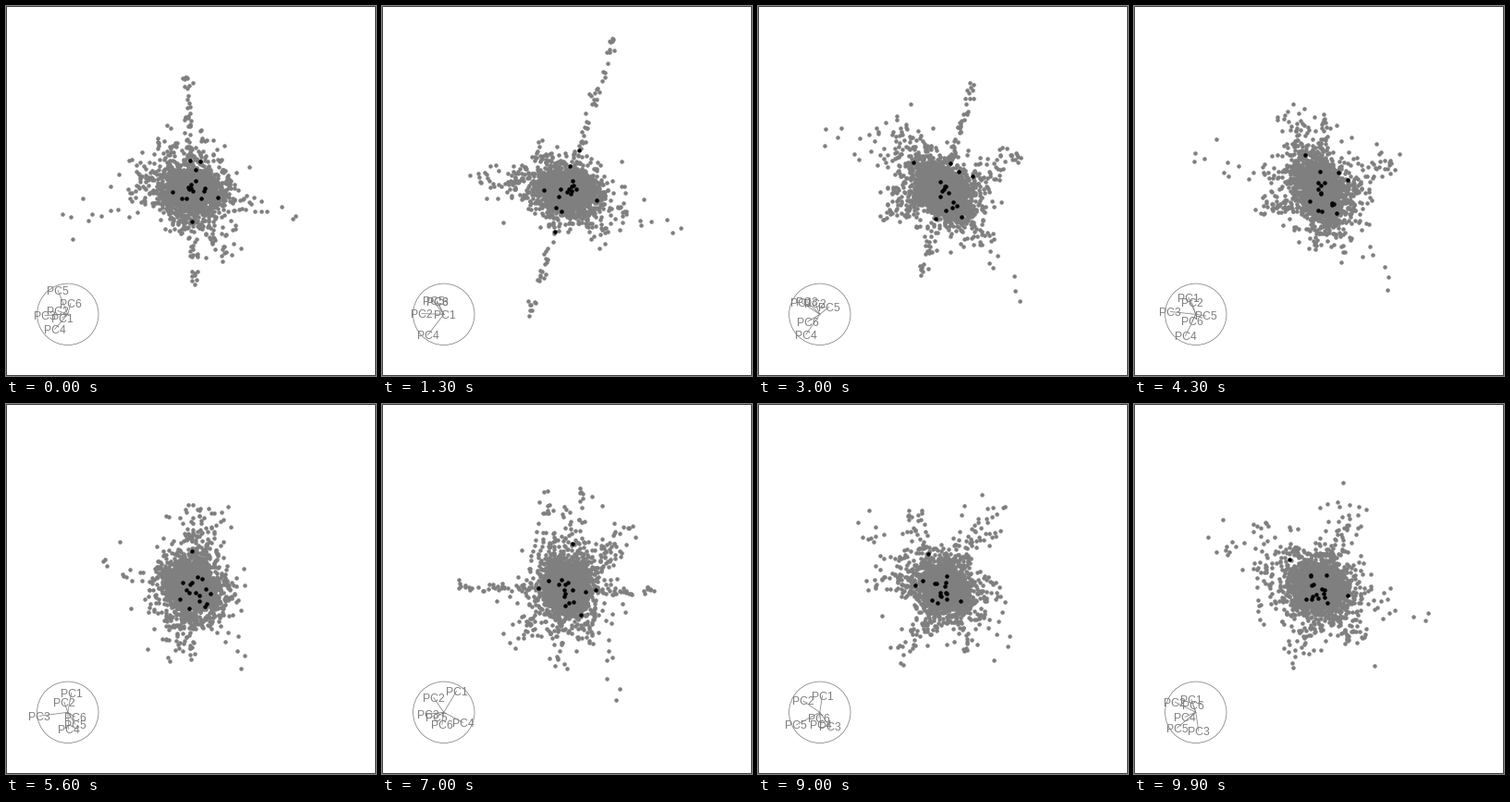
Write a matplotlib script that moves like this. It is 400 px wide and 400 px high and loops after 10 s.

```python
import numpy as np
import matplotlib.pyplot as plt
from matplotlib.animation import FuncAnimation
from matplotlib.patches import Circle, Rectangle

SIZE, FRAMES, STEP = 400, 100, 100
PT = 0.72                      # points per pixel at 100 dpi
GREY = "#7f7f7f"
UNIT = 33.2                    # pixels per data unit, also the dial radius
HUB = np.array([66.8, 333.3])

# Key views of the tour: time (s) -> rough x and y loadings of PC1..PC6
VIEWS = {
    0.0: ((-6, -11, -25, -14, -11, 3), (-4, 4, -1, -16, 26, 12)),
    1.3: ((1, -24, -7, -18, -11, -7), (0, 0, 14, -23, 14, 14)),
    3.0: ((-20, -5, -14, -15, 10, -13), (13, 12, 14, -22, 8, -8)),
    5.6: ((4, -4, -31, 1, 8, 8), (21, 11, -4, -18, -13, -5)),
    7.0: ((14, -11, -17, 21, -8, -2), (23, 16, -2, -11, -5, -13)),
    9.0: ((3, -18, 11, 1, -26, -1), (18, 12, -15, -13, -14, -6)),
    9.9: ((-5, -23, 3, -12, -21, -3), (14, 11, -20, -5, -17, 8)),
}


def orthonormal(m):
    u, _, vt = np.linalg.svd(m, full_matrices=False)
    return u @ vt


TIMES = list(VIEWS)
PLANES = [orthonormal(np.array(v, float).T) for v in VIEWS.values()]


def basis(t):
    """6x2 projection at time t, turning from one key view to the next."""
    i = min(np.searchsorted(TIMES, t, side="right") - 1, len(TIMES) - 2)
    k = (t - TIMES[i]) / (TIMES[i + 1] - TIMES[i])
    return orthonormal((1 - k) * PLANES[i] + k * PLANES[i + 1])


rng = np.random.default_rng(11)
PC1, PC2, PC3, PC4, PC5, PC6 = np.eye(6)
SPREAD = np.linspace(.52, .3, 6)   # later components vary less


def blob(n):
    """Gaussian cloud with slightly heavy tails."""
    return rng.normal(0, SPREAD, (n, 6)) * np.exp(rng.normal(0, .3, (n, 1)))


def arm(tip, n, power, jitter=.25):
    """Points thinning out towards the tip, the last one on it."""
    t = rng.random((n, 1)) ** power
    t[-1] = 1
    return t * tip + rng.normal(0, jitter, (n, 6)) * (t < 1)


spike = .5 * PC1 - 1.3 * PC2 + 2.1 * PC3 - 3.9 * PC4 + 2.1 * PC5 + 1.3 * PC6
tail = -2 * PC1 - 4.3 * PC2 - 1.8 * PC3 - .8 * PC5
left = 2 * PC1 + 2 * PC2 + 3 * PC3 + 1.5 * PC4
fan = 2 * PC1 + 4 * PC2 + PC5
crest = 3 * PC1 + 2.5 * PC2
wing = -1.2 * PC3 - PC4 + 2.4 * PC5 - 1.9 * PC6
cross = 2.3 * PC1 - PC3 - 2.3 * PC5

cloud = np.vstack([
    blob(1350),
    rng.normal(0, .2, (330, 1)) * tail + .8 * blob(330),
    arm(spike, 60, 1.3, .08), arm(-.82 * spike, 42, 1.5, .08),
    arm(tail, 45, 3), arm(left, 40, 2.4),
    arm(fan, 60, 2), arm(crest, 60, 1.7), arm(-.7 * crest, 40, 1.7),
    arm(wing, 95, 1.4), arm(-.8 * wing, 70, 1.4),
    arm(cross, 110, 1.3), arm(-.8 * cross, 90, 1.4),
])
marked = np.vstack([
    .27 * spike, -.27 * spike, .26 * tail, .4 * wing, .45 * crest,
    .65 * blob(12),
])

fig = plt.figure(figsize=(4, 4), dpi=100, facecolor="white")
ax = fig.add_axes([0, 0, 1, 1])
ax.set_xlim(0, SIZE)
ax.set_ylim(SIZE, 0)
ax.axis("off")
ax.add_patch(Rectangle((.5, .5), SIZE - 1, SIZE - 1, fill=False,
                       ec="black", lw=.75 * PT, snap=False))


def dots(color, z):
    return ax.plot([], [], "o", ms=4.5 * PT, mew=0, color=color, zorder=z)[0]


grey_dots, black_dots = dots(GREY, 2), dots("black", 3)
thin = dict(lw=.75 * PT, zorder=4)
ax.add_patch(Circle(HUB, UNIT, fill=False, ec=GREY, **thin))
spokes = [ax.plot([], [], color=GREY, **thin)[0] for _ in range(6)]
names = [ax.text(0, 0, f"PC{i + 1}", family="Liberation Sans",
                 size=12.2 * PT, color=GREY, ha="center", va="baseline",
                 zorder=5) for i in range(6)]


def to_screen(points, plane, origin):
    return origin + UNIT * (points @ plane) * (1, -1)


def update(i):
    plane = basis(i * STEP / 1000)
    for artist, data in ((grey_dots, cloud), (black_dots, marked)):
        artist.set_data(*to_screen(data, plane, (200, 200)).T)
    tips = to_screen(np.eye(6), plane, HUB)
    for line, name, tip in zip(spokes, names, tips):
        line.set_data(*np.array([HUB, tip]).T)
        name.set_position((tip[0], tip[1] + 4.4))
    return [grey_dots, black_dots, *spokes, *names]


anim = FuncAnimation(fig, update, frames=FRAMES, interval=STEP,
                     repeat=True, repeat_delay=0)
plt.show()
```
